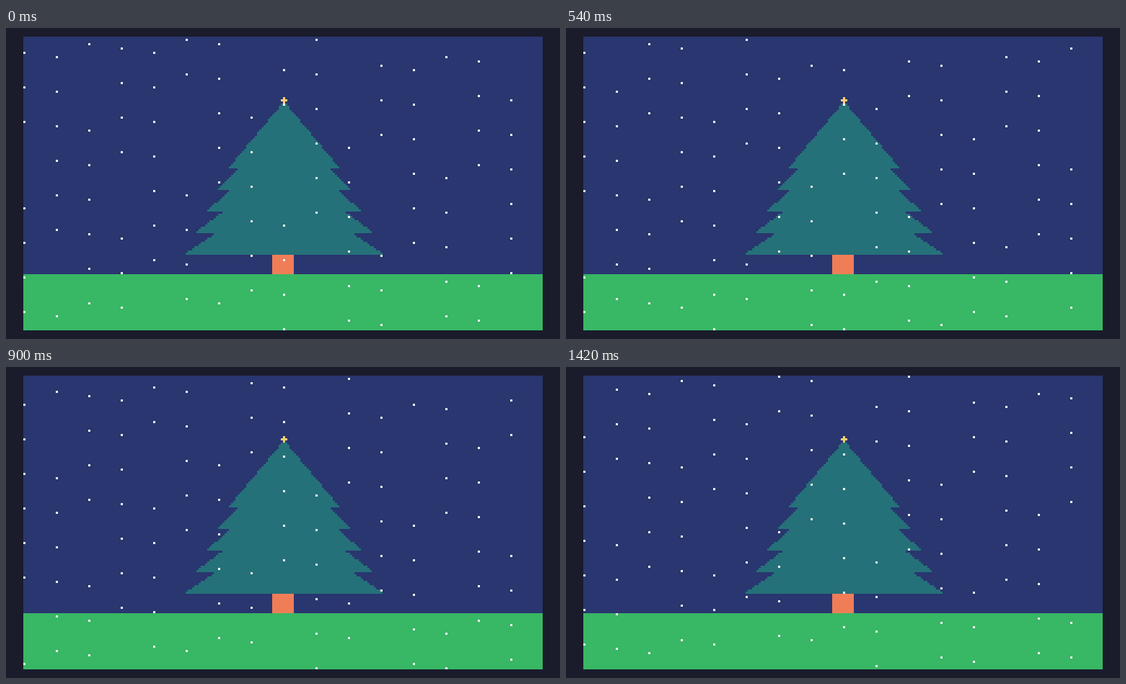
An HTML page with a canvas for the animation above (1.44 s loop, 768 by 432 pixels).

```html
<!DOCTYPE html>
<html>
<head>
<meta charset="utf-8">
<title>Snowy tree</title>
<style>
  html, body { margin: 0; height: 100%; overflow: hidden; background: #1a1c2c; }
  canvas { display: block; }
</style>
</head>
<body>
<canvas id="stage" width="768" height="432"></canvas>
<script>
const LOOP = 1440, STEP = 20;
const W = 240, H = 136;
const ctx = document.getElementById('stage').getContext('2d');
ctx.setTransform(3, 0, 0, 3, 24, 12);

function rect(x, y, w, h, color) {
  ctx.fillStyle = color;
  ctx.fillRect(x, y, w, h);
}

// Filled row by row so the edges stay pixelated
function branch(top, halfWidth) {
  const height = 30;
  for (let row = 0; row <= height; row++) {
    const half = Math.min(halfWidth, Math.floor((row + 0.5) * halfWidth / height));
    rect(120 - half, top + row, half * 2 + 1, 1, '#257179');
  }
}

function draw(now) {
  const step = Math.floor(now % LOOP / STEP);
  const fall = Math.floor(step * 6 / 5);

  rect(0, 0, W, H, '#29366f');
  rect(0, 110, W, 26, '#38b764');
  rect(115, 100, 10, 10, '#ef7d57');
  for (let i = 0; i < 5; i++) branch(30 + i * 10, 25 + i * 5);
  rect(119, 29, 3, 1, '#ffcd75');
  rect(120, 28, 1, 3, '#ffcd75');
  for (let i = 0; i <= 100; i++) {
    rect(i * 15 % W, (39 + i * 50 + fall) % H, 1, 1, '#f4f4f4');
  }
}

function tick() {
  draw(performance.now());
  requestAnimationFrame(tick);
}
tick();
</script>
</body>
</html>
```
